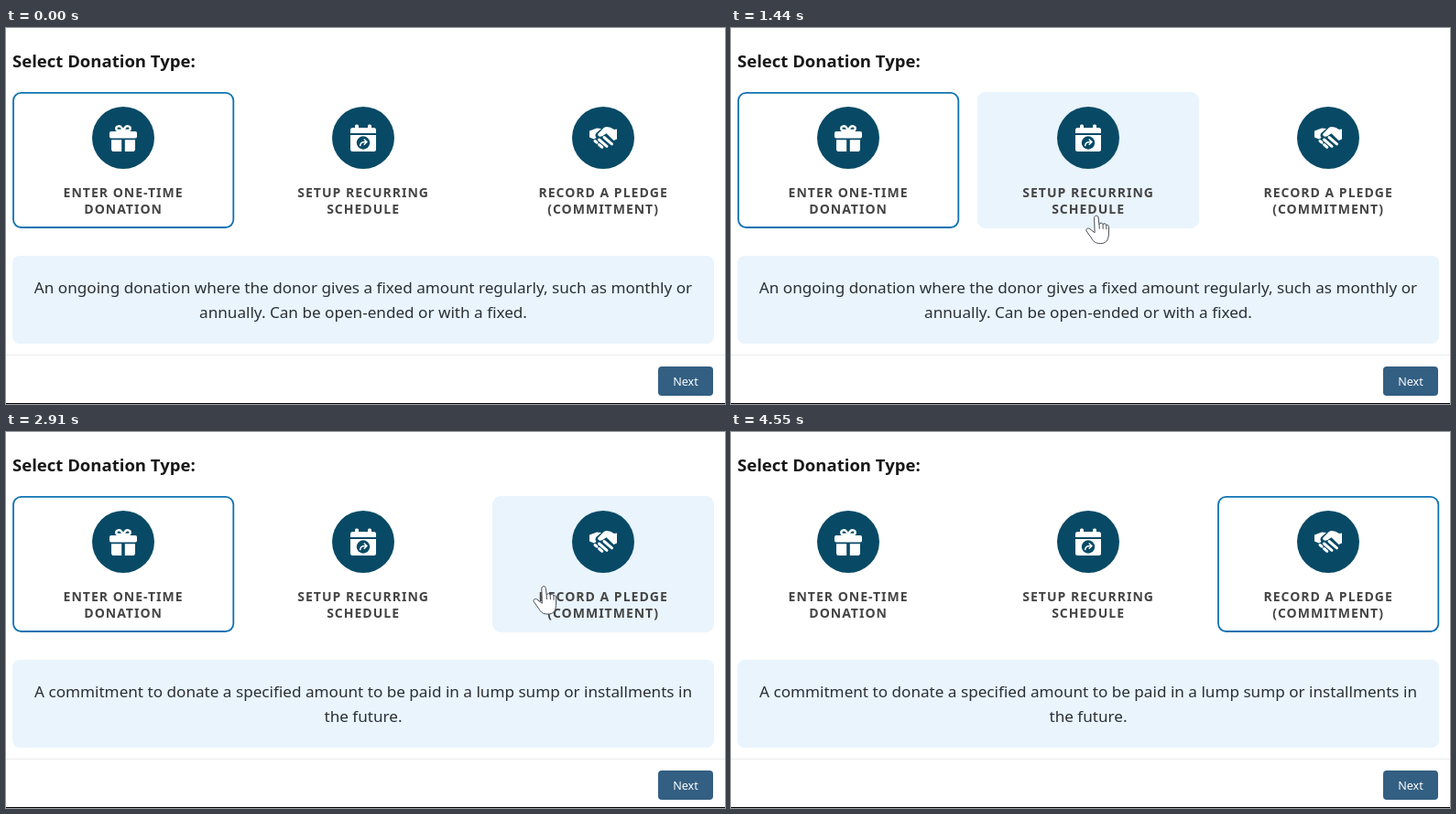
Animation, 785 px wide and 411 px high, one loop 4770 ms. Source, as an HTML page:

```html
<!DOCTYPE html>
<html lang="en">
<head>
<meta charset="utf-8">
<title>Donation type</title>
<style>
  html, body { margin: 0; width: 100%; height: 100%; overflow: hidden; background: #fff; }
  svg { display: block; width: 785px; height: 411px; font-family: "Noto Sans", "Open Sans", sans-serif; }
  .title { font-size: 18.55px; font-weight: 700; fill: #181818; }
  .label { font-size: 14px; font-weight: 700; letter-spacing: 1px; fill: #444; text-anchor: middle; }
  .info { font-size: 17.14px; fill: #2b3036; text-anchor: middle; }
  .next { font-size: 12.6px; fill: #fff; text-anchor: middle; }
  .line { fill: none; stroke: #fff; stroke-linecap: round; }
</style>
</head>
<body>
<svg viewBox="0 0 785 411">
  <defs>
    <g id="gift">
      <rect x="-15" y="-7" width="30" height="7.5" rx="1.8"/>
      <path d="M-13 2.300h11.200v12.700h-8.400q-2.800 0-2.800-2.800zM13 2.300h-11.200v12.700h8.400q2.800 0 2.800-2.800z"/>
      <path class="line" stroke-width="2.4" d="M0-8L-1.800-11C-3.500-13.700-7.800-13-7.700-10.200C-7.600-8.700-6.800-8-5.500-8H5.500C6.800-8 7.600-8.700 7.700-10.200C7.800-13 3.500-13.700 1.800-11Z"/>
    </g>
    <g id="calendar">
      <rect x="-9" y="-14.500" width="4" height="7" rx="1.500"/>
      <rect x="5" y="-14.500" width="4" height="7" rx="1.500"/>
      <path d="M-14-8.500q0-2.500 2.500-2.500h23q2.500 0 2.500 2.500v3.500h-28z"/>
      <path d="M-14-3h28v15.500q0 2.500-2.500 2.500h-23q-2.500 0-2.500-2.500z"/>
      <circle cy="5.500" r="7.200" fill="#084a66"/>
      <path class="line" stroke-width="1.500" d="M-3.300 8.600q.3-4 5.300-4M1.200 2l2.700 2.600-2.700 2.600"/>
    </g>
    <g id="shake">
      <path d="M-15-7.500L-7-10.500-2-10-7.500-5.200Q-9.500-2.500-7.500 0L-10 1.500-15-.500Z"/>
      <path d="M-6-4L.5-10.700Q2-12 4-12L8-11.200 12-9 15-9.500V1.500L11.500 3 3.500-4.700-1-1.700Q-5.500-.2-6-4Z"/>
      <path class="line" stroke-width="3" d="M-9 3.500l2 1.700M-4.500 2l8.500 7.300M1-.5l8.500 7.300M-4.500 7.500l3.300 2.800"/>
    </g>
  </defs>
  <rect width="785" height="411" fill="#fff"/>
  <text class="title" x="7" y="43">Select Donation Type:</text>
  <g id="cards"></g>
  <rect x="7" y="249" width="766" height="96" rx="8" fill="#e9f4fd"/>
  <text class="info" id="line1" x="390" y="290"></text>
  <text class="info" id="line2" x="390" y="317"></text>
  <rect y="357" width="785" height="1" fill="#e9ebed"/>
  <rect x="712" y="370" width="60" height="32" rx="4" fill="#335f83"/>
  <text class="next" x="742" y="391">Next</text>
  <rect y="410" width="785" height="1" fill="#000"/>
  <g id="hand" fill="#fff" stroke="#454b54" stroke-width="1" stroke-linejoin="round" stroke-linecap="round">
    <path d="M-2.200 2.200C-2.200-.5 1.900-.7 2.200 2L3.200 9.500C4 7.600 7 7.700 7.200 9.700C8 8.200 10.900 8.500 11 10.700C12 9.700 13.600 10.300 13.700 12.500L13.500 21C13 28 10 30.500 4.500 30.500C-1 30.500-3 28.500-5 25L-10.700 17C-12 14.500-9 13-7 14.700L-2 18.500Z"/>
    <path d="M3.200 9.500l.3 4.700M7.200 9.700l.2 4.700M11 10.700l.1 4.200" fill="none"/>
  </g>
</svg>
<script>
const LOOP = 4770;
const $ = id => document.getElementById(id);

const cards = [
  { x: 128, icon: "gift", lines: ["ENTER ONE-TIME", "DONATION"] },
  { x: 390, icon: "calendar", lines: ["SETUP RECURRING", "SCHEDULE"] },
  { x: 652, icon: "shake", lines: ["RECORD A PLEDGE", "(COMMITMENT)"] }
];

const info = {
  recurring: [
    "An ongoing donation where the donor gives a fixed amount regularly, such as monthly or",
    "annually. Can be open-ended or with a fixed."
  ],
  pledge: [
    "A commitment to donate a specified amount to be paid in a lump sump or installments in",
    "the future."
  ]
};

$("cards").innerHTML = cards.map(({ x, icon, lines }, i) => `
  <rect id="fill${i}" x="${x - 121}" y="70" width="242" height="149" rx="9" fill="#e9f4fd"/>
  <rect id="edge${i}" x="${x - 120}" y="70.8" width="240.3" height="147.2" rx="8.5" fill="none" stroke="#0f73b3" stroke-width="1.8"/>
  <circle cx="${x}" cy="120" r="34" fill="#084a66"/>
  <use href="#${icon}" x="${x}" y="120" fill="#fff"/>
  ${lines.map((s, k) => `<text class="label" x="${x + 0.1}" y="${185 + 18 * k}">${s}</text>`).join("")}
`).join("");

// Pointer stops: time, x, y of the fingertip
const path = [
  [780, 397, 250], [870, 398.8, 205], [1790, 398.8, 205],
  [2120, 587, 168.5], [3640, 587, 168.5], [3660, 587, 170.5],
  [3790, 587, 170.5], [4270, 622, 412]
];

const clamp = v => Math.min(1, Math.max(0, v));
const ease = v => v * v * (3 - 2 * v);
const ramp = (t, a, b) => ease(clamp((t - a) / (b - a)));

function pointer(t) {
  const i = path.findIndex(p => p[0] > t);
  if (i < 1) return null;
  const [t0, x0, y0] = path[i - 1], [t1, x1, y1] = path[i];
  const k = ramp(t, t0, t1);
  return [x0 + (x1 - x0) * k, y0 + (y1 - y0) * k];
}

function draw(t) {
  const hover = [
    0,
    ramp(t, 1200, 1430) - ramp(t, 1900, 2120),
    ramp(t, 2040, 2280) - ramp(t, 3880, 4130)
  ];
  const picked = ramp(t, 2910, 3110);
  const edge = [1 - picked, 0, picked];
  cards.forEach((_, i) => {
    $("fill" + i).setAttribute("opacity", hover[i]);
    $("edge" + i).setAttribute("opacity", edge[i]);
  });

  const text = t < 2040 ? info.recurring : info.pledge;
  $("line1").textContent = text[0];
  $("line2").textContent = text[1];

  const at = pointer(t);
  $("hand").setAttribute("visibility", at ? "visible" : "hidden");
  if (at) $("hand").setAttribute("transform", `translate(${at})`);
}

const start = performance.now();
function tick() {
  draw((performance.now() - start) % LOOP);
  requestAnimationFrame(tick);
}
tick();
</script>
</body>
</html>
```
